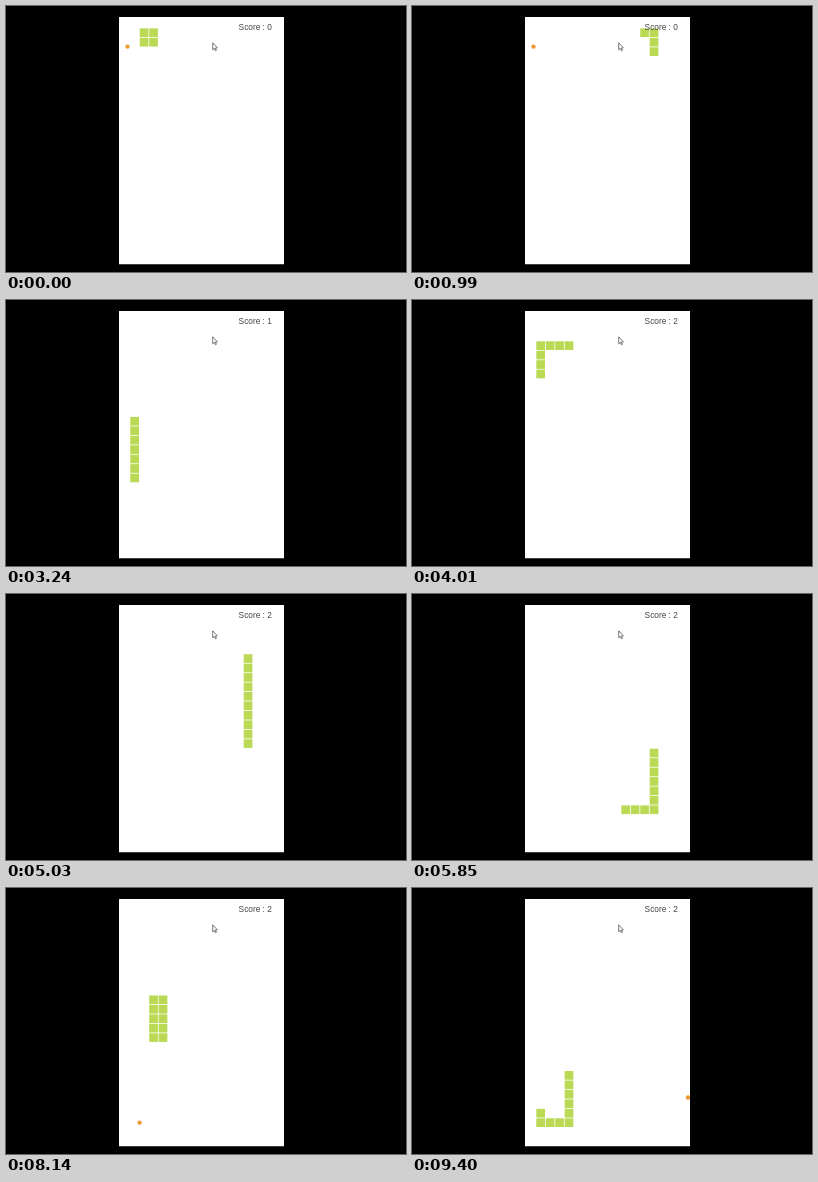
Recreate the animation shown at these times as an HTML page with a canvas. Size 400 by 266 pixels, loop 9710 ms.

```html
<!DOCTYPE html>
<html lang="en">
<head>
<meta charset="utf-8">
<title>Snake</title>
<style>
  html, body { margin: 0; width: 100%; height: 100%; overflow: hidden; background: #000; }
  canvas { display: block; width: 400px; height: 266px; }
</style>
</head>
<body>
<canvas id="stage" width="400" height="266"></canvas>
<script>
const ctx = document.getElementById("stage").getContext("2d");
const LOOP = 9710, TICK = 50;
const PITCH = 9.45, SIZE = 8.7, LEFT = 124.3, TOP = 22.4;
const BOARD = [113, 11, 165, 247.5];

// Every cell the head visits, beginning with the body at rest.
const ROUTE = "R10 D16 L12 U14 R12 D18 L10 U11 R1 D13 L3 U1";
const DIRS = { R: [1, 0], L: [-1, 0], D: [0, 1], U: [0, -1] };
const trail = [[2, 1], [1, 1], [1, 0], [2, 0]];
for (const leg of ROUTE.split(" ")) {
  const [dx, dy] = DIRS[leg[0]];
  for (let i = 0; i < +leg.slice(1); i++) {
    const [x, y] = trail[trail.length - 1];
    trail.push([x + dx, y + dy]);
  }
}

// Bursts of key repeats: start time, ticks, moves.
const BURSTS = [
  [210, 7, 11], [990, 1, 1], [1040, 8, 15], [1900, 6, 10],
  [2360, 1, 1], [2610, 1, 1], [3140, 8, 14], [4010, 7, 12],
  [4780, 6, 10], [5080, 6, 8], [5850, 6, 10], [6570, 6, 10],
  [7130, 1, 1], [7610, 1, 1], [8090, 8, 13],
  [8920, 1, 1], [9080, 1, 1], [9400, 1, 1]
];
const MEALS = [38, 55]; // move counts at which food is eaten

// Food: from, until, x, y.
const FOOD = [
  [0, 1590, 121.5, 40.6], [1590, 2360, 130, 177],
  [6410, 8870, 133.6, 234.6], [8870, LOOP, 276, 209.5]
];

const clamp = (v, lo, hi) => Math.min(hi, Math.max(lo, v));

function movesAt(t) {
  let sum = 0;
  for (const [start, ticks, moves] of BURSTS) {
    if (t < start) break;
    const done = Math.min(ticks, Math.floor((t - start) / TICK) + 1);
    sum += Math.round(moves * done / ticks);
  }
  return sum;
}

function drawSnake(moves) {
  const grown = MEALS.reduce((n, m) => n + clamp(moves - m - 1, 0, 3), 0);
  const head = moves + 3;
  ctx.fillStyle = "#bada55";
  for (const [x, y] of trail.slice(head - 3 - grown, head + 1)) {
    ctx.fillRect(LEFT + x * PITCH, TOP + y * PITCH, SIZE, SIZE);
  }
}

function drawFood(t) {
  ctx.fillStyle = "#ec9a35";
  for (const [from, until, x, y] of FOOD) {
    if (t < from || t >= until) continue;
    ctx.beginPath();
    ctx.arc(x, y, 2.2, 0, Math.PI * 2);
    ctx.fill();
  }
}

function drawCursor() {
  const shape = [[0, 0], [0, 7], [1.6, 5.6], [2.7, 8], [3.7, 7.5], [2.7, 5.2], [4.7, 5.1]];
  ctx.beginPath();
  for (const [x, y] of shape) ctx.lineTo(206.7 + x, 36.8 + y);
  ctx.closePath();
  ctx.fillStyle = "#fff";
  ctx.fill();
  ctx.strokeStyle = "#555";
  ctx.lineWidth = 0.8;
  ctx.stroke();
}

function draw(t) {
  const moves = movesAt(t);
  ctx.fillStyle = "#000";
  ctx.fillRect(0, 0, 400, 266);
  ctx.save();
  ctx.beginPath();
  ctx.rect(...BOARD);
  ctx.clip();
  ctx.fillStyle = "#fff";
  ctx.fillRect(...BOARD);
  drawFood(t);
  drawSnake(moves);
  ctx.fillStyle = "#444";
  ctx.font = "8.3px 'Liberation Sans', Arial, sans-serif";
  ctx.fillText("Score : " + MEALS.filter(m => moves >= m).length, 232.6, 23.5);
  drawCursor();
  ctx.restore();
}

const begin = performance.now();
function frame() {
  draw((performance.now() - begin) % LOOP);
  requestAnimationFrame(frame);
}
frame();
</script>
</body>
</html>
```
